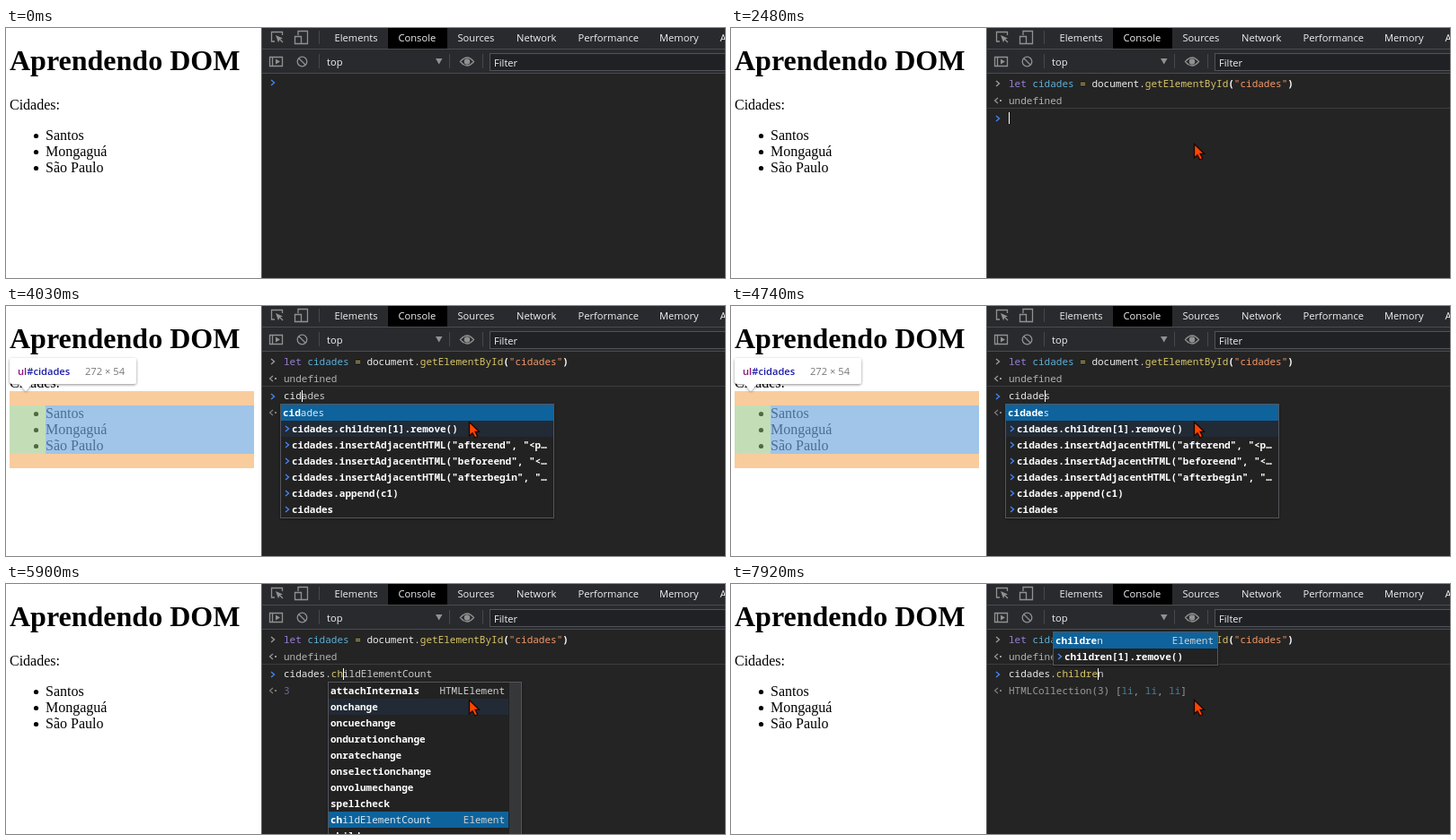
An HTML page for the animation above (8000 ms loop, 800 by 279 pixels).

```html
<!DOCTYPE html>
<html lang="pt">
<head>
<meta charset="utf-8">
<title>Aprendendo DOM</title>
<style>
html, body { margin: 0; width: 100%; height: 100%; overflow: hidden; background: #fff; }
svg { display: block; width: 800px; height: 279px; }
text { white-space: pre; }
.serif { font-family: "Liberation Serif", serif; font-size: 16px; fill: #000; }
.title { font-size: 32px; font-weight: bold; }
.ui { font-family: "Open Sans", sans-serif; font-size: 11.15px; fill: #f0f1f3; }
.mono { font-family: "Noto Sans Mono", monospace; font-size: 11px; font-weight: 500; fill: #e0e0e0; }
.option { fill: #fff; font-weight: 600; }
.chosen { fill: #d8e8f4; font-weight: 500; }
.match { fill: #fff; font-weight: 700; }
.origin { fill: #d0d0d0; text-anchor: end; }
.icon { fill: none; stroke: #919191; stroke-width: 1.3; }
rect { shape-rendering: crispEdges; }
.tip rect { shape-rendering: auto; }
</style>
</head>
<body>
<svg id="stage" viewBox="0 0 800 279">
  <defs>
    <filter id="shadow" x="-20%" y="-40%" width="140%" height="200%">
      <feDropShadow dx="0" dy="1" stdDeviation="1.6" flood-opacity=".45"/>
    </filter>
  </defs>
  <g class="serif">
    <text class="title" x="4" y="47">Aprendendo DOM</text>
    <text x="4" y="91">Cidades:</text>
    <circle cx="33.5" cy="120.5" r="2.6"/><text x="44" y="125">Santos</text>
    <circle cx="33.5" cy="138.5" r="2.6"/><text x="44" y="143">Mongaguá</text>
    <circle cx="33.5" cy="156.5" r="2.6"/><text x="44" y="161">São Paulo</text>
  </g>
  <g id="node"></g>
  <rect x="284" width="516" height="279" fill="#242424"/>
  <rect x="284" width="516" height="51" fill="#292a2d"/>
  <rect x="425" width="66" height="23" fill="#000"/>
  <rect x="284" y="23" width="516" height="1" fill="#494c50"/>
  <rect x="284" y="50" width="516" height="1" fill="#494c50"/>
  <rect x="284" width="1" height="279" fill="#55585c"/>
  <g fill="#45484c">
    <rect x="348" y="3" width="1" height="15"/>
    <rect x="348" y="29" width="1" height="16"/>
    <rect x="493" y="29" width="1" height="16"/>
    <rect x="530" y="29" width="1" height="16"/>
  </g>
  <rect x="538" y="28" width="270" height="20" fill="#505357"/>
  <rect x="539" y="29" width="270" height="18" fill="#202124"/>
  <g class="icon">
    <path d="M299 15H295.500V4.500H307.500V8"/>
    <path d="M300 8l8 3.500-3.500 1.200-1.500 3.600z" fill="#919191" stroke="none"/>
    <path d="M304 12l4 4M325 8V3.500H335.500V17.500H329M321.500 9.500H328.500V17.500H321.500z"/>
    <path d="M293.500 32.500H307.500V42.500H293.500zM296.500 32V43"/>
    <path d="M300 34.500l5 3-5 3z" fill="#919191" stroke="none"/>
    <circle cx="329.500" cy="37.500" r="5.300"/><path d="M326 34l7 7"/>
    <path d="M505.500 37.500Q513 28.500 520.500 37.500Q513 46.500 505.500 37.500z"/>
    <circle cx="513" cy="37.500" r="2.600" fill="#919191"/>
    <path d="M478 34h7.500l-3.750 6.500z" fill="#919191" stroke="none"/>
  </g>
  <g class="ui">
    <text x="365.500" y="15">Elements</text>
    <text x="436.500" y="15">Console</text>
    <text x="502.500" y="15">Sources</text>
    <text x="568" y="15">Network</text>
    <text x="636.500" y="15">Performance</text>
    <text x="727" y="15">Memory</text>
    <text x="794.500" y="15">Application</text>
    <text x="357" y="42">top</text>
    <text x="543" y="43">Filter</text>
  </g>
  <g id="console"></g>
  <rect id="caret" width="1" height="13" fill="#fff"/>
  <g id="popup"></g>
  <path id="pointer" d="M515.500 129.500V145l3.500-3.300 2.700 5.300 3-1.500-2.600-5.200h4.400z" fill="#ff4500" stroke="#1a0500" stroke-width="1.3"/>
</svg>
<script>
const LOOP = 8000, CHAR = 6.6, LEFT = 309, ROW = 18;
const el = id => document.getElementById(id);
const esc = s => s.replace(/&/g, '&amp;').replace(/</g, '&lt;');
const rect = (x, y, w, h, fill) => `<rect x="${x}" y="${y}" width="${w}" height="${h}" fill="${fill}"/>`;
const label = (x, y, s, cls = 'mono') => `<text class="${cls}" x="${x}" y="${y}">${s}</text>`;
const chevron = (x, y, color) =>
  `<path d="M${x} ${y - 3}l3.500 3-3.500 3" fill="none" stroke="${color}" stroke-width="1.4"/>`;
const back = y => `<path d="M297 ${y - 3}l-3.500 3 3.500 3" fill="none" stroke="#999" stroke-width="1.2"/>` +
  rect(299, y - 1, 2, 2, '#999');

// One line of code from [color, text, attributes] runs.
const code = (y, parts) => `<text class="mono" x="${LEFT}" y="${y}">` +
  parts.map(([fill, s, more = '']) => `<tspan style="fill:${fill}" ${more}>${esc(s)}</tspan>`).join('') + '</text>';

function statement(y, matching) {
  const paren = `font-weight="700"${matching ? ' text-decoration="underline"' : ''}`;
  return code(y, [['#9a7fd5', 'let '], ['#5db0d7', 'cidades '], ['#d2c057', '= '], ['#ececec', 'document.'],
    ['#d9c668', 'getElementById'], ['#fff', '(', paren], ['#f29766', '"cidades"'], ['#fff', ')', paren]]);
}

// A leading ">" marks a history entry; "|" sets off the owning interface.
const lists = {
  globals: { x: 305, w: 305, bar: 17, rows: ['caches', 'cancelAnimationFrame', 'cancelIdleCallback', 'captureEvents',
    'chrome', 'cidades', 'clearInterval', 'clearTimeout', 'clientInformation', 'close'] },
  variable: { x: 305, w: 305, rows: ['cidades', '>cidades.children[1].remove()',
    '>cidades.insertAdjacentHTML("afterend", "<p…', '>cidades.insertAdjacentHTML("beforeend", "<…',
    '>cidades.insertAdjacentHTML("afterbegin", "…', '>cidades.append(c1)', '>cidades'] },
  members: { x: 358, w: 216, bar: 17, rows: ['accessKey|HTMLElement', 'attachInternals', 'autocapitalize', 'autofocus',
    'blur', 'click', 'contentEditable', 'dataset', 'dir', 'draggable'] },
  c: { x: 358, w: 216, bar: 17, rows: ['click|HTMLElement', 'contentEditable', 'accessKey', 'attachInternals',
    'autocapitalize', 'autofocus', 'focus', 'onchange', 'onclick', 'oncuechange'] },
  ch: { x: 358, w: 216, bar: 170, chosen: 8, rows: ['attachInternals|HTMLElement', 'onchange', 'oncuechange',
    'ondurationchange', 'onratechange', 'onselectionchange', 'onvolumechange', 'spellcheck',
    'childElementCount|Element', 'children'] },
  chi: { x: 358, w: 216, chosen: 1, rows: ['attachInternals|HTMLElement', 'childElementCount|Element', 'children',
    'firstElementChild', 'lastElementChild', 'childNodes|Node', 'appendChild', 'firstChild', 'hasChildNodes',
    'lastChild'] },
  child: { x: 358, w: 216, rows: ['childElementCount|Element', 'children', 'firstElementChild', 'lastElementChild',
    'childNodes|Node', 'appendChild', 'firstChild', 'hasChildNodes', 'lastChild', 'removeChild'] },
  children: { x: 358, w: 184, y: 53, rows: ['children|Element', '>children[1].remove()'] }
};

const emphasize = (name, query) => query
  ? esc(name).replace(new RegExp(query, 'i'), '<tspan class="match">$&</tspan>') : esc(name);

function drawList({ x, w, y = 109, bar, chosen = 0, rows }, query) {
  const h = rows.length * ROW + 2, inner = w - 2 - (bar ? 13 : 0);
  let out = `<rect x="${x + .5}" y="${y + .5}" width="${w - 1}" height="${h - 1}" fill="#242424" stroke="#54575b" filter="url(#shadow)"/>`;
  rows.forEach((row, i) => {
    const [name, origin] = row.split('|'), top = y + 1 + i * ROW, past = name[0] === '>';
    if (i === chosen) out += rect(x + 1, top, inner, ROW, '#0e639c');
    else if (i === 1 && y > 100) out += rect(x + 1, top, inner, ROW, '#222a35');
    if (past) out += chevron(x + 6, top + 9, '#4285f4');
    out += label(x + (past ? 13 : 3), top + 13, emphasize(past ? name.slice(1) : name, query),
      'mono ' + (i === chosen ? 'chosen' : 'option'));
    if (origin) out += label(x + w - (bar ? 19 : 5), top + 13, origin, 'mono origin');
  });
  if (bar) out += rect(x + w - 15, y + 1, 14, h - 2, '#202122') + rect(x + w - 14, y + 1, 13, bar, '#363739');
  return out;
}

const steps = [
  { at: 0, text: '' },
  { at: 1000, pasted: true },
  { at: 2400, text: '' },
  { at: 3500, text: 'c', full: 'caches', list: 'globals' },
  ...[3750, 3900, 4050, 4200, 4350, 4950].map((at, i) =>
    ({ at, text: 'cidades'.slice(0, i + 2), full: 'cidades', list: 'variable', node: true, result: 'node' })),
  { at: 5250, text: 'cidades.', list: 'members' },
  { at: 5500, text: 'cidades.c', full: 'cidades.click', list: 'c' },
  { at: 5750, text: 'cidades.ch', full: 'cidades.childElementCount', list: 'ch', result: 'count' },
  { at: 6500, text: 'cidades.chi', full: 'cidades.childElementCount', list: 'chi', result: 'count' },
  { at: 7000, text: 'cidades.chil', full: 'cidades.childElementCount', list: 'child', result: 'count' },
  { at: 7150, text: 'cidades.child', full: 'cidades.childElementCount', list: 'child', result: 'count' },
  { at: 7400, text: 'cidades.childr', full: 'cidades.children', list: 'children', result: 'items' },
  { at: 7700, text: 'cidades.childre', full: 'cidades.children', list: 'children', result: 'items' }
];

const results = {
  node: '',
  count: code(123, [['#75639c', '3']]),
  items: code(123, [['#9a9a9a', 'HTMLCollection(3) ['], ['#467f9c', 'li'], ['#9a9a9a', ', '], ['#467f9c', 'li'],
    ['#9a9a9a', ', '], ['#467f9c', 'li'], ['#9a9a9a', ']']])
};

const overlay = rect(4, 95, 272, 16, 'rgba(246,178,107,.66)') + rect(4, 165, 272, 16, 'rgba(246,178,107,.66)') +
  rect(4, 111, 40, 54, 'rgba(147,196,125,.55)') + rect(44, 111, 232, 54, 'rgba(111,168,220,.66)') +
  `<g class="tip"><g filter="url(#shadow)" fill="#fff"><rect x="4" y="58" width="141" height="29" rx="3"/>
  <path d="M14 86h16l-8 9z"/></g><text class="ui" x="13" y="77" style="font-weight:600"><tspan
  style="fill:#881280">ul</tspan><tspan style="fill:#1a1aa6">#cidades</tspan></text>
  <text class="ui" x="88" y="77" style="fill:#777">272 × 54</text></g>`;

function drawConsole({ text, full = text, pasted, sent, result }) {
  if (!sent) return chevron(295, 61, '#4285f4') + (pasted ? statement(65, true) : '');
  const dot = text.indexOf('.') + 1 || text.length;
  return chevron(295, 62, '#999') + statement(66) + back(81) +
    `<g opacity=".75">${label(LEFT, 85, 'undefined')}</g>` +
    rect(285, 89, 515, 1, '#3d3d3d') + chevron(295, 101, '#4285f4') +
    code(104, [['#e8e8e8', text.slice(0, dot)], ['#d9c668', text.slice(dot)], ['#cacaca', full.slice(text.length)]]) +
    (result ? `<g opacity=".75">${back(119)}</g>` + results[result] : '');
}

let shown;
function show(step) {
  const sent = step.at >= 2400, length = step.pasted ? 48 : step.text.length;
  el('console').innerHTML = drawConsole({ ...step, sent });
  el('popup').innerHTML = step.list ? drawList(lists[step.list], step.text.split('.').pop()) : '';
  el('node').innerHTML = step.node ? overlay : '';
  el('caret').setAttribute('x', Math.round(LEFT + length * CHAR));
  el('caret').setAttribute('y', sent ? 94 : 55);
  shown = step;
}

const start = performance.now();
function frame() {
  const t = (performance.now() - start) % LOOP;
  const step = steps.findLast(s => s.at <= t);
  if (step !== shown) show(step);
  // The caret starts dark in the empty prompt and lit after each key.
  const lit = ((t - step.at) % 1060 < 530) === (step.at > 0);
  el('caret').style.display = lit ? '' : 'none';
  el('pointer').style.display = t < 70 ? 'none' : '';
  requestAnimationFrame(frame);
}
frame();
</script>
</body>
</html>
```
